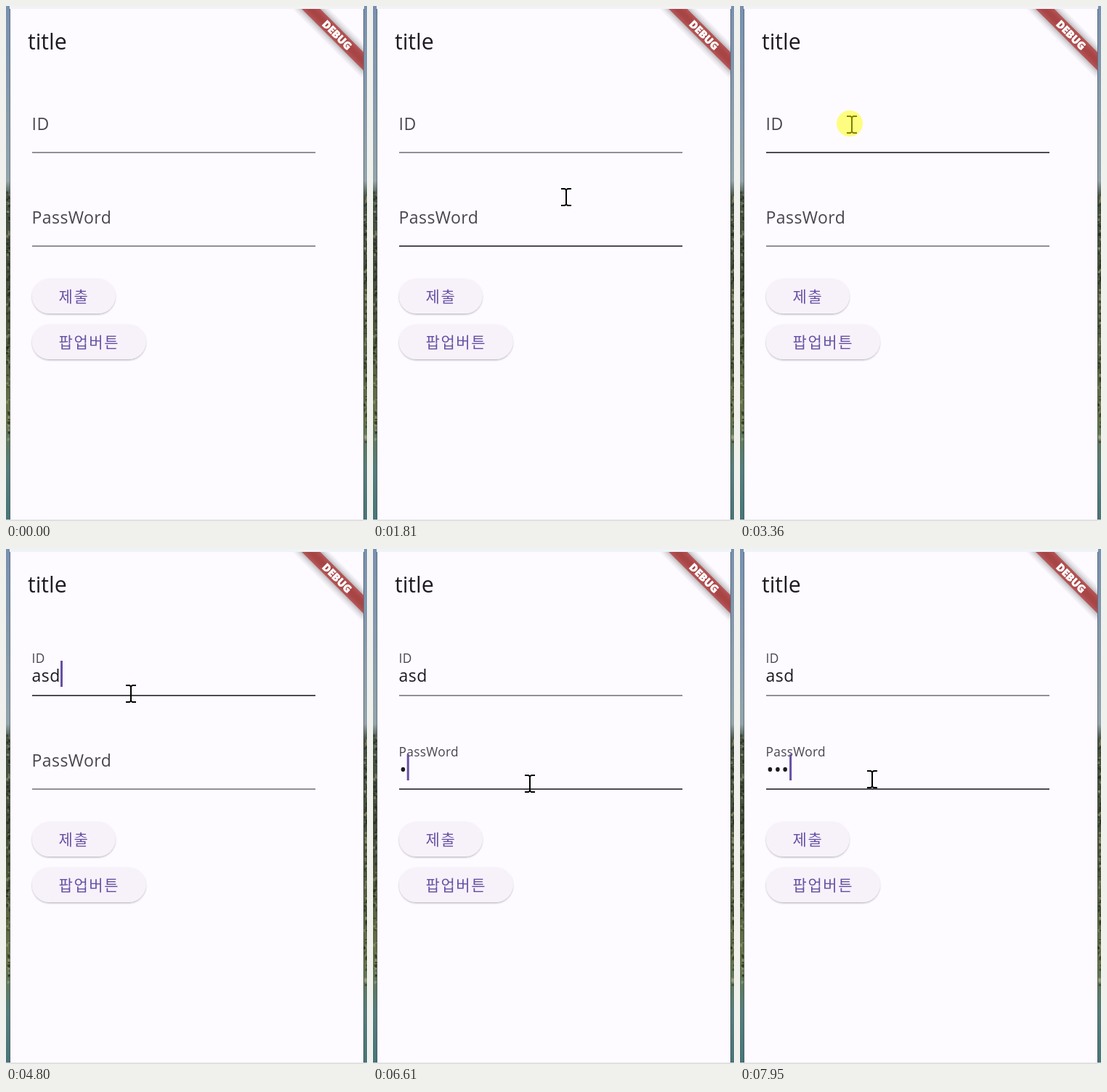
Write an HTML page that moves like this. It is 497x710 px and loops after 8000 ms.

```html
<!DOCTYPE html>
<html lang="ko">
<head>
<meta charset="utf-8">
<title>Login form</title>
<style>
html, body { margin: 0; width: 100%; height: 100%; overflow: hidden; background: #fdfbff; }
svg { display: block; width: 497px; height: 710px; }
text { font-family: "Open Sans", "Noto Sans", sans-serif; white-space: pre; }
.label, .value { font-size: 23px; letter-spacing: .4px; }
.value { fill: #1d1b20; letter-spacing: .6px; }
.dots { font-size: 26px; }
.button { fill: #f7f2fa; filter: url(#lift); }
.caption { font: 300 21px "Noto Sans CJK KR", "Noto Sans CJK", sans-serif; letter-spacing: 1.6px; fill: #6750a4; }
.banner { font-size: 14.6px; font-weight: 800; fill: #fff; stroke: #fff; stroke-width: .5; text-anchor: middle; }
</style>
</head>
<body>
<svg viewBox="0 0 497 710">
  <defs>
    <linearGradient id="view" x2="0" y2="1">
      <stop offset="0" stop-color="#7890b0"/>
      <stop offset=".34" stop-color="#93a4ab"/>
      <stop offset=".37" stop-color="#465243"/>
      <stop offset=".58" stop-color="#48503a"/>
      <stop offset=".8" stop-color="#66744a"/>
      <stop offset=".9" stop-color="#557d7c"/>
      <stop offset="1" stop-color="#487579"/>
    </linearGradient>
    <clipPath id="app"><rect x="6" y="4" width="486" height="704"/></clipPath>
    <filter id="soft" x="-50%" y="-50%" width="200%" height="200%"><feGaussianBlur stdDeviation="6"/></filter>
    <filter id="lift" x="-10%" y="-20%" width="120%" height="150%">
      <feDropShadow dx="0" dy="1.3" stdDeviation=".9" flood-color="#000" flood-opacity=".28"/>
    </filter>
  </defs>

  <rect width="497" height="710" fill="url(#view)"/>
  <g id="foliage"></g>
  <rect x="5" y="4" width="488" height="704" fill="#40484f" opacity=".5"/>
  <rect x="6" y="4" width="486" height="704" fill="#fdfbff"/>
  <rect id="topBar" x="5" width="488" height="4"/>
  <rect y="708" width="497" height="2" fill="#e0e0e1"/>

  <text x="30" y="60" font-size="30.3" fill="#1d1b20">title</text>
  <g id="fields"></g>

  <rect class="button" x="36" y="376" width="114.5" height="48" rx="24"/>
  <text class="caption" x="72.5" y="407.5">제출</text>
  <rect class="button" x="36" y="439" width="156.5" height="48" rx="24"/>
  <text class="caption" x="72.5" y="470.5">팝업버튼</text>

  <g clip-path="url(#app)">
    <g transform="translate(492 4) rotate(45)">
      <rect x="-70" y="42" width="140" height="18" opacity=".5" filter="url(#soft)"/>
      <rect x="-70" y="42" width="140" height="18" fill="#b71c1c" fill-opacity=".627"/>
      <text class="banner" y="56.3">DEBUG</text>
    </g>
  </g>

  <g id="pointer">
    <path id="arrow" d="M0 0V24L5.5 19 9.5 27.5 13 26 9 17.5H17Z" fill="#fff" stroke="#000" stroke-width="1.3"/>
    <path id="beam" d="M-7 -11.5H-2L0 -10 2 -11.5H7M-7 11.5H-2L0 10 2 11.5H7M0 -10V10" fill="none" stroke="#000" stroke-width="2"/>
  </g>
  <circle id="press" r="18" fill="#ff0" fill-opacity=".5"/>
</svg>
<script>
const LOOP = 8000, TICK = 1000 / 15, PHASE = 8;
const FADE = 160, BLINK = 500, FOCUS_DELAY = 30, PRESS_TIME = 125;
const GREY = [146, 144, 150], DARK = [78, 75, 83], PURPLE = [101, 83, 165], LABEL = [73, 69, 79];

const $ = id => document.getElementById(id);
const clamp = v => Math.max(0, Math.min(1, v));
const lerp = (a, b, p) => a + (b - a) * p;
const blend = (a, b, p) => a.map((v, i) => lerp(v, b[i], p));
const rgb = c => `rgb(${c.map(Math.round)})`;
const show = (node, on) => node.style.display = on ? '' : 'none';
function ramp(t, start, length = FADE) {
  const p = clamp((t - start) / length);
  return p * p * (3 - 2 * p);
}

function svg(tag, attrs, parent) {
  const node = document.createElementNS('http://www.w3.org/2000/svg', tag);
  set(node, attrs);
  return parent.appendChild(node);
}
function set(node, attrs) {
  for (const key in attrs) node.setAttribute(key, attrs[key]);
}

// Seeded leaves and shade over the landscape strips.
let seed = 7;
const random = () => (seed = seed * 16807 % 2147483647) / 2147483647;
for (let i = 0; i < 240; i++) {
  svg('rect', {
    x: (i % 2 ? 492 : 0) + random() * 4, y: 255 + random() * 350, width: 3, height: 1 + random() * 4,
    fill: random() < .6 ? '#1c2418' : '#a3a27c', opacity: .5
  }, $('foliage'));
}

// Each move: start, end, then the point reached.
const entry = [395, 712];
const moves = [
  [530, 930, 250, 336], [1210, 1800, 266, 264], [2080, 2600, 150, 49], [2610, 2750, 165, 176],
  [3010, 3150, 154, 164], [3840, 4530, 164, 191], [4670, 4740, 172, 200], [5000, 5540, 175, 316],
  [5810, 6270, 216, 324], [6740, 6940, 205, 318], [7140, 7300, 190, 349], [7300, 7540, 182, 318]];
const pointerAt = t => moves.reduce(
  (at, [start, end, ...to]) => blend(at, to, ramp(t, start, end - start)), entry);

const inside = (f, [x, y]) => x >= 36 && x <= 426 && y >= f.top && y <= f.top + 69;

// Share of the last moments that the pointer spent over the field.
function hoverLevel(f, t) {
  const steps = 10;
  let hits = 0;
  for (let i = 0; i < steps; i++) hits += inside(f, pointerAt(t - i * FADE / steps));
  return hits / steps;
}

const fields = [
  { name: 'ID', top: 134, text: 'asd', press: 3340, spot: [151, 162], typeAt: 3880, typeGap: 305, advance: 13 },
  { name: 'PassWord', top: 263, text: '•••', press: 5680, spot: [172, 314], typeAt: 6600, typeGap: 165, advance: 10.7 }
];

fields.forEach((f, i) => {
  const g = svg('g', { transform: `translate(0 ${f.top})` }, $('fields'));
  f.focusAt = f.press + FOCUS_DELAY;
  f.blurAt = fields[i + 1] ? fields[i + 1].press + FOCUS_DELAY : Infinity;
  f.line = svg('rect', { x: 36, width: 390 }, g);
  f.label = svg('text', { class: 'label' }, g);
  f.label.textContent = f.name;
  f.value = svg('text', i ? { class: 'value dots', x: 36.6, y: 50.3 } : { class: 'value', x: 35.4, y: 49 }, g);
  f.caret = svg('rect', { y: 20, width: 3, height: 36, fill: '#6750a4' }, g);
});

function drawField(f, t) {
  const hover = hoverLevel(f, t);
  const focus = ramp(t, f.focusAt) - ramp(t, f.blurAt);
  const accent = focus * (1 - hover);
  const thickness = 2 + accent;
  set(f.line, {
    y: 68 - thickness / 2, height: thickness,
    fill: rgb(blend(blend(GREY, DARK, hover), PURPLE, accent))
  });

  const up = ramp(t, f.focusAt);
  set(f.label, {
    transform: `translate(35.6 ${lerp(37, 23, up)}) scale(${lerp(1, .75, up)})`,
    fill: rgb(blend(LABEL, PURPLE, accent))
  });

  const count = Math.max(0, Math.min(f.text.length, 1 + Math.floor((t - f.typeAt) / f.typeGap)));
  const lastInput = count ? f.typeAt + (count - 1) * f.typeGap : f.focusAt;
  f.value.textContent = f.text.slice(0, count);
  f.caret.setAttribute('x', 36 + count * f.advance);
  show(f.caret, t >= f.focusAt && t < f.blurAt && Math.floor((t - lastInput) / BLINK) % 2 === 0);
}

function draw(time) {
  const t = Math.max(0, Math.floor((time - PHASE) / TICK) * TICK + PHASE);
  fields.forEach(f => drawField(f, t));

  const point = pointerAt(t);
  const overField = fields.some(f => inside(f, point));
  $('pointer').setAttribute('transform', `translate(${Math.round(point[0])} ${Math.round(point[1]) - .5})`);
  show($('beam'), overField);
  show($('arrow'), !overField);

  const pressed = fields.find(f => t >= f.press && t < f.press + PRESS_TIME);
  show($('press'), pressed);
  if (pressed) set($('press'), { cx: pressed.spot[0], cy: pressed.spot[1] });
  $('topBar').setAttribute('fill', t < fields[0].focusAt ? '#f2f2f5' : '#eef3f7');
}

const start = performance.now();
function loop() {
  draw((performance.now() - start) % LOOP);
  requestAnimationFrame(loop);
}
loop();
</script>
</body>
</html>
```
